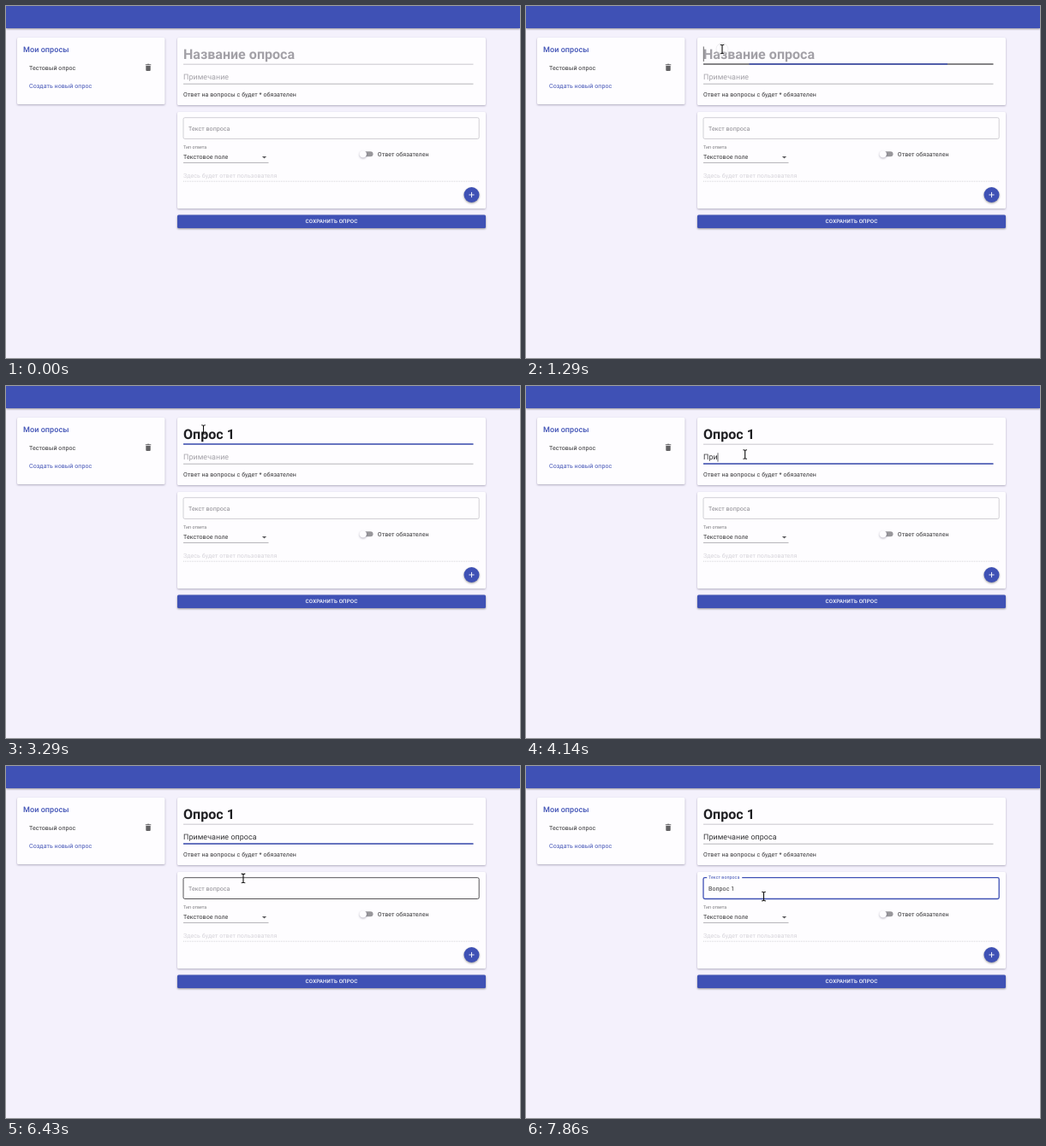
An HTML page for the animation above (8 s loop, 600 by 412 pixels).

```html
<!DOCTYPE html>
<html lang="ru">
<head>
<meta charset="utf-8">
<title>Конструктор опросов</title>
<style>
  html, body { margin: 0; width: 100%; height: 100%; overflow: hidden; background: #f4f1fc; }
  svg { display: block; width: 600px; height: 412px; }
  text {
    font: 400 7.03px Roboto, sans-serif; letter-spacing: .066px; fill: #323234;
    text-rendering: geometricPrecision; white-space: pre;
  }
  line, path { fill: none; }
  .blue { fill: #3f51b5; }
  .head { font-size: 9px; font-weight: 500; }
  .title { font-size: 16px; font-weight: 700; letter-spacing: .03px; fill: #1f1f22; }
  .note { font-size: 8.9px; letter-spacing: .08px; }
  .hint { fill: #a3a1a7; }
  .small { font-size: 5.27px; letter-spacing: .04px; fill: #767579; }
  .faint { fill: #d5d3d9; }
  .btn { font-size: 6.15px; font-weight: 500; letter-spacing: .176px; fill: #fff; text-anchor: middle; }
  .card { fill: #fefdff; filter: drop-shadow(0 1px 1px rgba(40, 35, 70, .34)); }
  .raised { fill: #3f51b5; filter: drop-shadow(0 1px 1px rgba(0, 0, 0, .4)); }
  .rule { stroke: #a5a4a9; stroke-width: .8; }
  .hover { stroke: #29292b; stroke-width: 1.1; }
  .focus { stroke: #3f51b5; stroke-width: 1.5; }
  #caret { stroke: #252527; stroke-width: .7; }
</style>
</head>
<body>
<svg viewBox="0 0 600 412">
  <rect width="600" height="412" fill="#f4f1fc"/>
  <rect width="600" height="26" class="raised"/>

  <rect class="card" x="13" y="37" width="172.5" height="78" rx="1.5"/>
  <text class="blue head" x="20" y="54.2">Мои опросы</text>
  <text x="27" y="74.6">Тестовый опрос</text>
  <text class="blue" x="27" y="95.8">Создать новый опрос</text>
  <path d="M163.3 69.9v5.2q0 1 1 1h3.4q1 0 1-1v-5.2zM162.8 68.3h1.8l.5-.6h1.9l.5.6h1.8v1h-6.5z" style="fill:#626164"/>

  <rect class="card" x="200" y="37" width="360" height="79" rx="1.5"/>
  <text class="title hint" id="titleHint" x="207" y="61.6">Название опроса</text>
  <text class="title" id="title" x="207" y="61.6"></text>
  <line class="rule" x1="207" x2="545.5" y1="68.2" y2="68.2" style="stroke:#bbb9c0"/>
  <line class="hover" id="titleHover" x1="207" x2="545.5" y1="68" y2="68"/>
  <line class="focus" id="titleFocus" y1="67.9" y2="67.9"/>
  <text class="note hint" id="noteHint" x="207" y="86.4">Примечание</text>
  <text class="note" id="note" x="207" y="86.4"></text>
  <line class="rule" x1="207" x2="545.5" y1="91.2" y2="91.2"/>
  <line class="hover" id="noteHover" x1="207" x2="545.5" y1="91" y2="91"/>
  <line class="focus" id="noteFocus" y1="90.9" y2="90.9"/>
  <text x="207" y="106.2">Ответ на вопросы с будет * обязателен</text>

  <rect class="card" x="200" y="124" width="360" height="113" rx="1.5"/>
  <rect id="box" x="207" y="130.7" width="345.2" height="24.8" rx="1.8" fill="none"/>
  <line id="notch" x1="211.2" y1="130.7" y2="130.7" stroke="#fefdff" stroke-width="2.4"/>
  <text id="label">Текст вопроса</text>
  <text id="ask" x="213" y="145.6"></text>

  <text class="small" x="207" y="167.3">Тип ответа</text>
  <text x="207" y="179.3">Текстовое поле</text>
  <path d="M298.9 176h5.2l-2.6 2.6z" style="fill:#59595c"/>
  <line class="rule" x1="207" x2="306.5" y1="183.5" y2="183.5"/>
  <rect x="414" y="170.3" width="14.5" height="6" rx="3" fill="#98979b"/>
  <circle class="card" cx="416.8" cy="173.4" r="4.2"/>
  <text x="433.8" y="175.8">Ответ обязателен</text>
  <text class="faint" x="207" y="200.7">Здесь будет ответ пользователя</text>
  <line x1="207" x2="552" y1="205.2" y2="205.2" stroke="#cbc9cf" stroke-width=".8" stroke-dasharray="1 1"/>
  <circle class="raised" cx="543.5" cy="221" r="9"/>
  <path d="M540.4 221h6.2m-3.1-3.1v6.2" stroke="#fff" stroke-width=".9"/>

  <rect class="raised" x="200" y="244.5" width="360" height="15.6" rx="1.5"/>
  <text class="btn" x="380" y="254.4">СОХРАНИТЬ ОПРОС</text>

  <line id="caret"/>
  <circle id="ring" r="7" fill="#fff" fill-opacity=".3" stroke="#9a98a0" stroke-opacity=".2" stroke-width=".8"/>
  <path id="cursor" d="M-2.3-5.3q2.3 0 2.3 1.1q0-1.1 2.3-1.1M0-4.4V4.4M-2.3 5.3q2.3 0 2.3-1.1q0 1.1 2.3 1.1" stroke="#111" stroke-width="1.1"/>
</svg>
<script>
const LOOP = 8000, FRAME = 1000 / 7, BLINK = 500;
const $ = id => document.getElementById(id);
const show = (id, on) => $(id).style.display = on ? '' : 'none';
const set = (id, attrs) => {
  for (const k in attrs) $(id).setAttribute(k, attrs[k]);
};
const mix = (a, b, p) => a + (b - a) * p;
const ease = x => 1 - (1 - Math.min(1, Math.max(0, x))) ** 3;

// on/off: focus span; keys: time of each keystroke; top/end: caret extent
const fields = {
  title: { on: 1222, off: 3600, top: 47.5, end: 65, value: 'Опрос 1',
    keys: [1990, 2075, 2160, 2245, 2330, 2415, 2500] },
  note: { on: 3600, off: 6480, top: 78.3, end: 88.6, value: 'Примечание опроса',
    keys: [3850, 3990, 4130, 4280, 4420, 4560, 4700, 4780, 4850, 4990,
      5400, 5400, 5560, 5700, 5760, 5800, 5850] },
  ask: { on: 6480, off: LOOP + 1, top: 138.8, end: 148, value: 'Вопрос 1',
    keys: [6720, 6800, 6880, 6960, 7040, 7100, 7130, 7280] }
};

// time, x, y
const path = [
  [857, 245, 150], [1000, 236, 92], [1143, 229, 50], [1286, 229, 50.5],
  [2000, 230.5, 51], [3429, 230.5, 51], [3571, 255.7, 80], [6000, 255.7, 80],
  [6143, 259, 88], [6286, 270, 112], [6429, 277, 131.5], [7429, 277, 131.5],
  [7571, 278, 137], [7714, 278, 147], [7857, 277.5, 152.6], [LOOP, 277.5, 152.6]
];

function pointer(t) {
  const i = path.findIndex(p => p[0] > t);
  if (i < 1) return null;
  const [a, b] = [path[i - 1], path[i]];
  const p = (t - a[0]) / (b[0] - a[0]);
  return { x: mix(a[1], b[1], p), y: mix(a[2], b[2], p) };
}

function drawField(id, f, t) {
  const past = f.keys.filter(k => k <= t);
  $(id).textContent = f.value.slice(0, past.length);
  if (t < f.on || t >= f.off) return;
  const last = past.length ? past[past.length - 1] : f.on;
  const lit = (t - last) % (2 * BLINK) < BLINK;
  show('caret', lit);
  if (!lit) return;
  const x = (id === 'ask' ? 213 : 207) + (past.length ? $(id).getComputedTextLength() : 0) + .3;
  set('caret', { x1: x, x2: x, y1: f.top, y2: f.end });
}

function drawRule(id, f, t, hovered) {
  const half = 169.25 * (ease((t - f.on) / 200) - ease((t - f.off) / 200));
  set(id + 'Focus', { x1: 376.25 - half, x2: 376.25 + half });
  show(id + 'Focus', half > .1);
  show(id + 'Hover', hovered);
  show(id + 'Hint', t < f.keys[0]);
}

function draw(t) {
  const at = pointer(t);
  const over = (top, end) => !!at && at.y > top && at.y < end;
  show('cursor', at);
  show('ring', t >= 1222 && t < 1420);
  if (at) {
    const move = `translate(${at.x} ${at.y})`;
    set('cursor', { transform: move });
    set('ring', { transform: move });
  }

  show('caret', false);
  for (const id in fields) drawField(id, fields[id], t);
  drawRule('title', fields.title, t, over(42, 69) && t < 1400);
  drawRule('note', fields.note, t, over(75, 93) && t < 3700);

  const active = t >= fields.ask.on;
  const p = ease((t - fields.ask.on) / 200);
  set('box', {
    stroke: active ? '#3f51b5' : over(130, 156) ? '#2b2a2d' : '#c6c4ca',
    'stroke-width': active ? 1.3 : .8
  });
  set('notch', { x2: 211.2 + 41 * p });
  show('notch', p > 0);
  set('label', {
    transform: `translate(213 ${mix(145.6, 132.3, p)}) scale(${mix(1, .75, p)})`,
    style: `fill: ${active ? '#3f51b5' : '#8b898f'}`
  });
}

function tick() {
  const t = performance.now() % LOOP;
  draw(Math.floor((t + 5) / FRAME) * FRAME % LOOP);
  requestAnimationFrame(tick);
}
tick();
</script>
</body>
</html>
```
